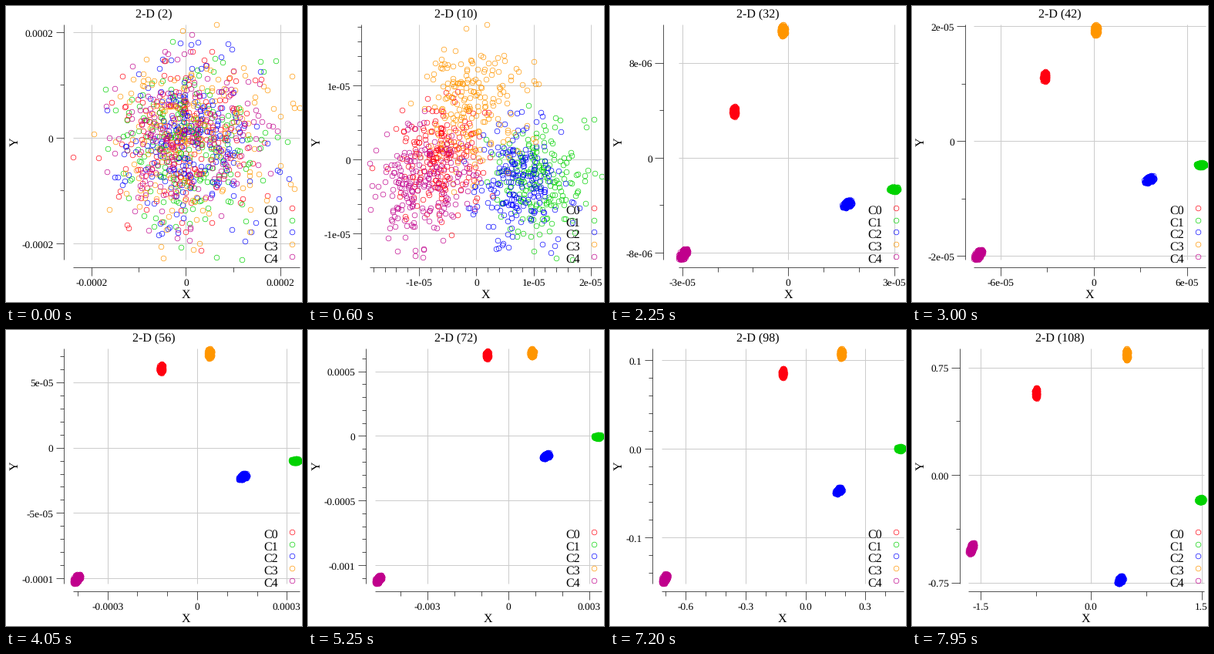
Animation of 384 by 384 pixels, one loop 8 s. Source, as a matplotlib script:

```python
import math

import matplotlib.pyplot as plt
import numpy as np
from matplotlib.animation import FuncAnimation
from matplotlib.collections import LineCollection

SIZE, DPI = 384, 96
INTERVAL, FRAMES, HOLD = 50, 160, 3
COLORS = ["#ff0010", "#00d200", "#0000ff", "#ff9600", "#c0008c"]
PER_CLASS = 200

plt.rcParams["font.family"] = "Liberation Serif"
plt.rcParams["text.hinting"] = "none"

# Centres of C1..C4 at a few steps; C0 balances them, as the mean stays at zero
WAYPOINTS = {
    9: [(148, -51), (91, -71.5), (-20, 192.5), (-134.5, -89.5)],
    27: [(127.3, -17), (59.5, -37.5), (16, 122.5), (-156, -170.8)],
    42: [(105, 14), (42, -17.5), (43, 104.5), (-180.5, -191.7)],
    53: [(143, -31.5), (38, -133.5), (46.5, 154), (-155.8, -93.5)],
}
SPREAD = np.array([(3, 6), (5.5, 2.8), (6, 4.5), (3.5, 6.5), (5.5, 6.3)])
# Log of the x and y scale as a cubic in the step, and where each levels off
GROWTH = np.array([(-1.4e-5, 0.005674, -0.01058, -16.443),
                   (-2.0e-5, 0.006867, -0.07876, -16.832)]).T
LIMIT = np.array([0.01072, 0.00682])

STEPS = list(WAYPOINTS)
CENTERS = np.array([[-np.sum(rest, axis=0), *rest] for rest in WAYPOINTS.values()])
DRIFT = np.polyfit(STEPS[:3], CENTERS[:3].reshape(3, -1), 2)

rng = np.random.default_rng(7)
NOISE = rng.standard_normal((5, PER_CLASS, 2))


def opening_cloud():
    """Normal noise stretched to the extent of the first plot."""
    low, high = np.array([-2.4e-4, -2.31e-4]), np.array([2.405e-4, 2.146e-4])
    middle = np.array([0, 8e-6])
    up = NOISE * (high - middle) / NOISE.max((0, 1))
    down = NOISE * (low - middle) / NOISE.min((0, 1))
    return middle + np.where(NOISE > 0, up, down)


def cluster_shapes():
    """Compact blobs within -1..1; C2 and C4 lean to the upper right."""
    radius = np.hypot(NOISE[..., 0], NOISE[..., 1])[..., None]
    shape = NOISE * np.tanh(radius / 2.2) / radius
    shape[2::2, :, 1] = 0.85 * shape[2::2, :, 1] + 0.5 * shape[2::2, :, 0]
    low, high = shape.min(1, keepdims=True), shape.max(1, keepdims=True)
    return 2 * (shape - low) / (high - low) - 1


CLOUD, SHAPES = opening_cloud(), cluster_shapes()


def points_at(step):
    scale = np.exp(np.polyval(GROWTH, step))
    scale = 1 / np.sqrt(scale ** -2 + LIMIT ** -2)

    center = np.polyval(DRIFT, np.clip(step, STEPS[0], STEPS[2])).reshape(5, 2)
    late = max(0, (step - STEPS[2]) / (STEPS[3] - STEPS[2])) ** 2
    center = center + late * (CENTERS[3] - center)

    size = np.array([np.interp(step, [9, 42, 53], [1.2, 0.8, end]) for end in (0.75, 1.15)])
    clusters = scale * (center[:, None] + (SPREAD * size)[:, None] * SHAPES)
    fade = math.exp(-0.75 * step)
    return fade * CLOUD + (1 - fade) * clusters


def best_labels(low, high, want=3):
    """Talbot, Lin and Hanrahan's label search, labels kept within the data."""
    nice = [1, 5, 2, 2.5, 4, 3]
    eps = 2.2e-14
    reach = 0.1 * (high - low)
    best, top = None, -2

    def total(simplicity, coverage, density):
        return 0.25 * simplicity + 0.2 * coverage + 0.5 * density + 0.05

    skip = 0
    while True:
        skip += 1
        for rank, q in enumerate(nice):
            plain = 1 - rank / (len(nice) - 1) - skip
            if total(plain + 1, 1, 1) < top:
                return best
            have = 1
            while True:
                have += 1
                dense = 1 if have < want else 2 - (have - 1) / (want - 1)
                if total(plain + 1, 1, dense) < top:
                    break
                mag = math.ceil(math.log10((high - low) / (have + 1) / skip / q)) - 1
                while True:
                    mag += 1
                    step = skip * q * 10.0 ** mag
                    span = step * (have - 1)
                    over = max(0, 0.5 * (span - (high - low)))
                    if total(plain + 1, 1 - (over / reach) ** 2, dense) < top:
                        break
                    start = (math.floor(high / step) - (have - 1)) * skip
                    for n in range(start, math.ceil(high / step) * skip + 1):
                        a = n * step / skip
                        b = a + span
                        if a < low or b > high:
                            continue
                        rest = math.fmod(a, step)
                        zero = (rest < eps or step - rest < eps) and a <= 0 <= b
                        cover = 1 - 0.5 * ((high - b) ** 2 + (low - a) ** 2) / reach ** 2
                        ratio = (have - 1) / span * (high - low) / (want - 1)
                        score = total(plain + zero, cover, 2 - max(ratio, 1 / ratio))
                        if score > top:
                            top, best = score, (have, a, skip * q, q, mag)


def ticks_for(low, high):
    count, first, step, q, mag = best_labels(low, high)
    major = step * 10.0 ** mag
    kind, digits = ("g", 1) if mag < -1 or mag > 6 else ("f", 0)
    if q != int(q):
        digits += 2
    digits = min(6, max(digits, -mag))
    values = [first + i * major for i in range(count)]
    values = [0.0 if abs(v) < major * 1e-6 else v for v in values]
    parts = 5 if step in (1, 2.5) else int(step) if step in (2, 3, 4, 5) else 2
    minor = major / parts
    start, stop = math.ceil((low - first) / minor), math.floor((high - first) / minor)
    minors = [first + i * minor for i in range(start, stop + 1)
              if i % parts or not 0 <= i < count * parts]
    return values, [f"{v:.{digits}{kind}}" for v in values], minors


def text_width(text, em=40 / 3):
    return em * sum({"-": 0.333, ".": 0.25, "e": 0.444}.get(ch, 0.5) for ch in text)


def fit(low, high, edge_low, edge_high, boxes):
    """Shrink low..high until every label (fraction, half size) is inside the edges."""
    for t, half in boxes:
        if low + t * (high - low) - half < edge_low:
            low = (edge_low + half - t * high) / (1 - t)
        if low + t * (high - low) + half > edge_high:
            high = low + (edge_high - half - low) / t
    return low, high


fig = plt.figure(figsize=(SIZE / DPI, SIZE / DPI), dpi=DPI, facecolor="white")
ax = fig.add_axes([0, 0, 1, 1])
ax.set(xlim=(0, SIZE), ylim=(SIZE, 0))
ax.axis("off")

grid = ax.add_collection(LineCollection([], colors="#cccccc", linewidths=0.75, zorder=1))
frame_lines = ax.add_collection(LineCollection([], colors="black", linewidths=0.5, zorder=1.5))


def rings(color, x=(), y=()):
    return ax.plot(x, y, "o", ms=5, mfc="none", mec=color, mew=0.5, zorder=2)[0]


def label(x, y, text="", size=12, ha="center", **kw):
    return ax.text(x, y, text, size=size, ha=ha, va="baseline", **kw)


clouds = [rings(color) for color in COLORS]
title = label(192, 15)
x_name = label(234, 379, "X")
y_name = label(15.7, 177, "Y", rotation=90, rotation_mode="anchor")
x_labels = [label(0, 363, size=10) for _ in range(8)]
y_labels = [label(0, 0, size=10, ha="right") for _ in range(8)]
for n, legend_color in enumerate(COLORS):
    row = 262 + 15.7 * n
    label(353.4, row + 7.7, f"C{n}", ha="right")
    rings(legend_color, [370.67], [row])


def show_labels(artists, texts, spots):
    for i, artist in enumerate(artists):
        artist.set_visible(i < len(texts))
        if i < len(texts):
            artist.set_text(texts[i])
            artist.set_position(spots[i])


def update(frame):
    step = frame // HOLD
    points = points_at(step)
    (x0, y0), (x1, y1) = points.min((0, 1)), points.max((0, 1))
    xs, x_texts, x_minor = ticks_for(x0, x1)
    ys, y_texts, y_minor = ticks_for(y0, y1)

    axis_x, axis_y = 34.2 + max(map(text_width, y_texts)), 339.3
    left, right = fit(axis_x + 11.3, 380.67, axis_x + 7.5, SIZE,
                      [((v - x0) / (x1 - x0), text_width(s) / 2)
                       for v, s in zip(xs, x_texts)])
    below, above = fit(-329.2, -24, -332.7, -20.7,
                       [((v - y0) / (y1 - y0), 5) for v in ys])
    bottom, top = -below, -above

    def px(v):
        return left + (v - x0) / (x1 - x0) * (right - left)

    def py(v):
        return bottom - (v - y0) / (y1 - y0) * (bottom - top)

    grid.set_segments([[(px(v), top), (px(v), bottom)] for v in xs]
                      + [[(left, py(v)), (right, py(v))] for v in ys])
    lines = [[(left, axis_y), (right, axis_y)], [(axis_x, top), (axis_x, bottom)]]
    for values, length in ((xs, 10.67), (x_minor, 5.33)):
        lines += [[(px(v), axis_y), (px(v), axis_y + length)] for v in values]
    for values, length in ((ys, 10.67), (y_minor, 5.33)):
        lines += [[(axis_x - length, py(v)), (axis_x, py(v))] for v in values]
    frame_lines.set_segments(lines)

    show_labels(x_labels, x_texts, [(px(v), 363) for v in xs])
    show_labels(y_labels, y_texts, [(axis_x - 14, py(v) + 5.5) for v in ys])
    title.set_text(f"2-D ({2 * step + 2})")
    x_name.set_x((left + right) / 2)
    y_name.set_y((top + bottom) / 2)
    for cloud, group in zip(clouds, points):
        cloud.set_data(px(group[:, 0]), py(group[:, 1]))
    return []


anim = FuncAnimation(fig, update, frames=FRAMES, interval=INTERVAL,
                     init_func=lambda: [], repeat=True, repeat_delay=0)
plt.show()
```
